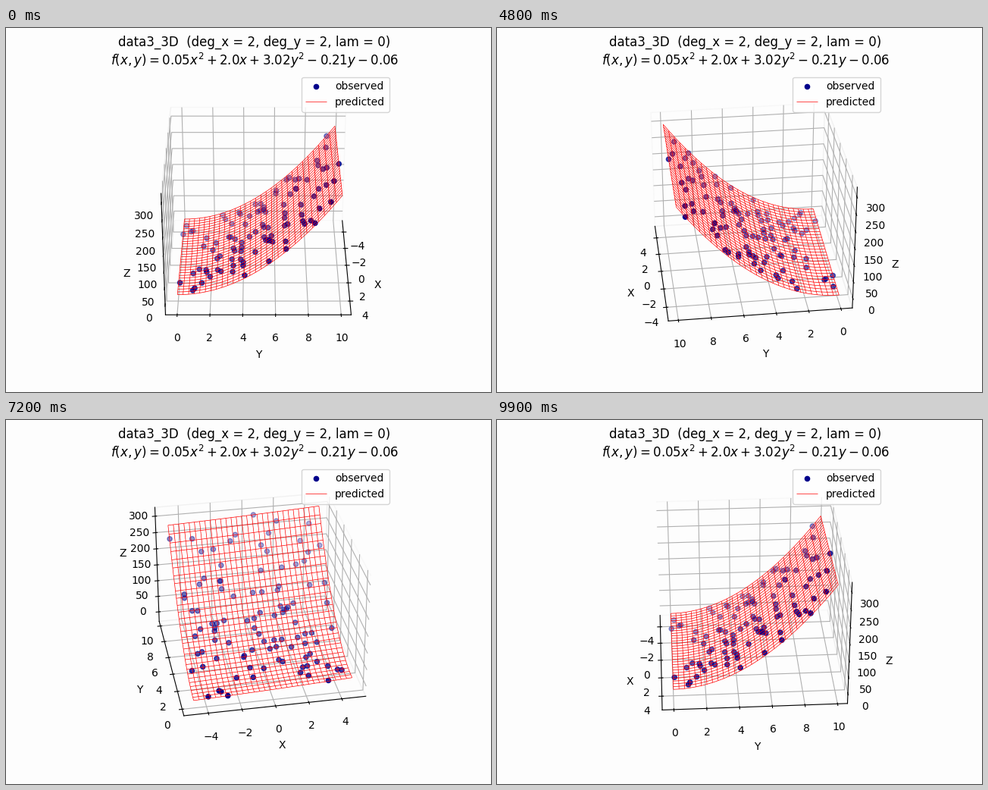
A matplotlib script for the animation above (10000 ms loop, 640 px wide and 480 px high).

```python
import numpy as np
import matplotlib.pyplot as plt
from matplotlib.animation import FuncAnimation

FRAMES, INTERVAL = 100, 100
X_RANGE, Y_RANGE = (-4.75, 4.765), (0.01, 9.89)
SAMPLES, GRID = 100, 30
BG = "#fdfdfd"


def surface(x, y):
    return 0.05 * x**2 + 2.0 * x + 3.02 * y**2 - 0.21 * y - 0.06


def padded(values):
    """Limits around the values: a 5 % margin, then 1/48 of the view."""
    low, high = np.min(values), np.max(values)
    pad = (high - low) * (0.05 + 1.1 / 48)
    return low - pad, high + pad


rng = np.random.default_rng(3)
xs = rng.uniform(*X_RANGE, SAMPLES)
ys = rng.uniform(*Y_RANGE, SAMPLES)
gx, gy = np.meshgrid(np.linspace(*X_RANGE, GRID), np.linspace(*Y_RANGE, GRID))
gz = surface(gx, gy)

fig = plt.figure(figsize=(6.4, 4.8), dpi=100, facecolor=BG)
ax = fig.add_subplot(projection="3d", facecolor=BG)
ax.scatter(xs, ys, surface(xs, ys), color="darkblue", label="observed")
ax.plot_wireframe(gx, gy, gz, color="red", linewidth=0.5, label="predicted")

ax.set(xlim=padded(gx), ylim=padded(gy), zlim=padded(gz),
       xlabel="X", ylabel="Y", zlabel="Z",
       xticks=range(-4, 5, 2), yticks=range(0, 11, 2), zticks=range(0, 301, 50))
for axis in (ax.xaxis, ax.yaxis, ax.zaxis):
    axis.pane.set_facecolor(BG)

ax.set_title("data3_3D  (deg_x = 2, deg_y = 2, lam = 0)\n"
             "$f(x, y) = 0.05x^2 + 2.0x + 3.02y^2 - 0.21y - 0.06$")
ax.legend(loc="upper right")


def update(i):
    # The tiny offset keeps the axes on a definite side at right angles.
    ax.view_init(elev=30, azim=360 * i / FRAMES + 0.01)
    return ()


anim = FuncAnimation(fig, update, frames=FRAMES, interval=INTERVAL,
                     init_func=lambda: update(0), repeat=True, repeat_delay=0)
plt.show()
```
